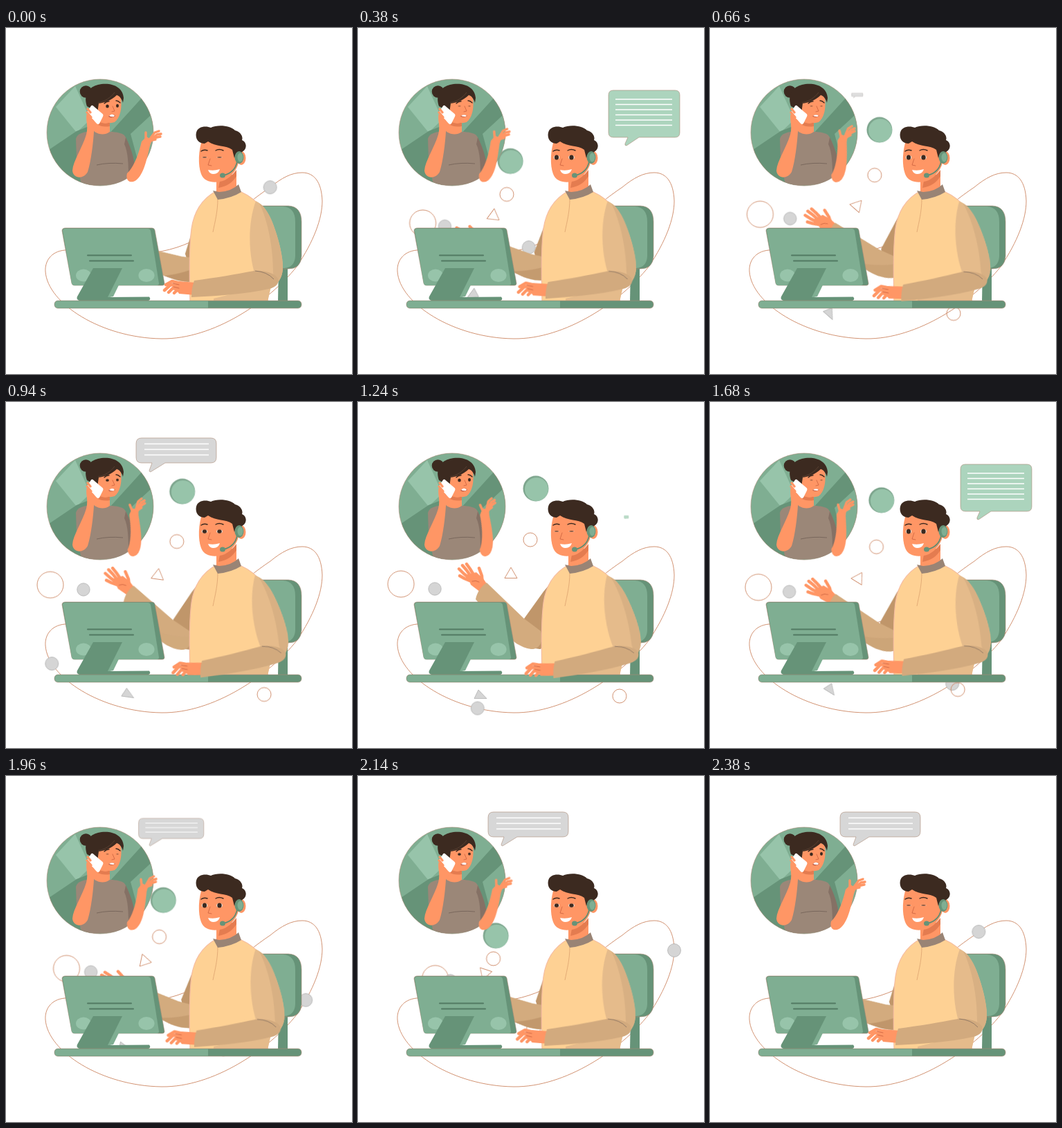
An HTML page that plays this animation: 500x500 px, repeating every 2400 ms.

```html
<!DOCTYPE html>
<html lang="en">
<head>
<meta charset="utf-8">
<title>Support call</title>
<style>
  html, body { margin: 0; width: 100%; height: 100%; overflow: hidden; background: #fff; }
  svg { display: block; width: 500px; height: 500px; }
  .mid { fill: #7fae92; }
  .dark { fill: #669378; }
  .light { fill: #97c4aa; }
  .skin { fill: #ff9665; }
  .hair { fill: #3c2a20; }
  .line { fill: none; stroke: #cc8663; stroke-width: .9; }
  .rim { stroke: #ab8b78; stroke-width: .6; }
  .ball { fill: #d5d5d5; stroke: #aaa; stroke-width: .7; }
  .fingers { fill: none; stroke: #ff9665; stroke-width: 4.4px; stroke-linecap: round; stroke-linejoin: round; }
  .fingers.thin { stroke-width: 3.4px; }
  .crease { fill: none; stroke: #c9613f; stroke-width: .8; stroke-linecap: round; }
  .brow { fill: none; stroke: #3c2a20; stroke-width: 1.4; stroke-linecap: round; }
  .rules { stroke: #fff; stroke-width: 1.4; }
  #shoulder { transform-origin: 290px 262px; }
  #elbow { transform-origin: 248px 341px; }
  #sleeve { transform-origin: 365px 262px; }
  #forearm { transform-origin: 385px 365px; }
  #wave { transform-origin: 184px 210px; }
  #manEyes { transform-origin: 298px 187px; }
  #womanEyes { transform-origin: 153px 113px; }
  #womanMouth { transform-origin: 153px 127px; }
  #reply { transform-origin: 386px 169px; }
  #ask { transform-origin: 207px 101px; }
</style>
</head>
<body>
<svg viewBox="0 0 500 500">
  <defs>
    <clipPath id="disc"><circle cx="136" cy="151" r="77"/></clipPath>
  </defs>

  <path id="orbit" class="line" d="M382 230C340 258 300 300 247 317C190 336 130 318 85 321C64 323 56 338 57 352C60 398 138 448 225 449C300 450 380 395 420 345C445 308 457 275 457 250C456 222 445 209 428 209C412 209 398 217 382 230Z"/>
  <circle id="satellite" class="ball" r="9.5"/>

  <!-- pieces that fly out from behind the monitor -->
  <g id="bigRing"><circle class="line" r="19"/></g>
  <g id="dot"><circle class="ball" r="9.2"/></g>
  <g id="smallRing"><circle class="line" r="10"/></g>
  <g id="deskRing"><circle class="line" r="10"/></g>
  <g id="openTri"><path class="line" d="M0 -9L9 6.5H-9Z"/></g>
  <g id="solidTri"><path class="ball" d="M-2 -7L10 5.5H-8Z"/></g>
  <g id="greenDot"><circle r="18.5" fill="#7da58d"/><circle class="light" cx="1" cy="1" r="17"/></g>

  <!-- caller -->
  <g clip-path="url(#disc)">
    <rect class="mid" x="58" y="73" width="157" height="156"/>
    <path class="light" d="M72 114L100 84L122 132L102 151Z"/>
    <path class="dark" d="M56 180L102 149L125 140V230H56Z"/>
    <path class="dark" d="M148 154L199 98L216 120L186 148L204 182L200 214H150Z"/>
    <path class="mid" d="M180 153L216 120V200L196 212Z"/>
  </g>
  <circle class="rim" cx="136" cy="151" r="77" fill="none"/>
  <path fill="#9b8778" d="M101 160C103 152 113 150 124 149L154 150C163 151 170 152 173 158C180 173 186 192 186 206L176 216C162 229 122 231 108 222L102 190Z"/>
  <path fill="#857165" d="M173 158C181 174 187 192 186 208L177 213C177 195 176 178 171 168Z"/>
  <path d="M131 198Q148 194 169 196" fill="none" stroke="#75645a" stroke-width=".9"/>
  <g id="wave">
    <path class="skin" d="M175 210C172 222 181 225 188 220C199 212 204 188 208 170L211 162L203 157L196 164C192 181 186 197 178 207Z"/>
    <path class="fingers thin" d="M202 166V151M206 163L215 151L221 149M208 163L218 154L224 153M208 164L218 158L223 157M207 163L216 161"/>
  </g>
  <path class="skin" d="M128 130H150V150Q140 157 128 150Z"/>
  <path fill="#e47c50" d="M131 133Q142 141 150 136V142Q140 144 131 139Z"/>
  <circle class="hair" cx="115.500" cy="92" r="8.800"/>
  <path class="skin" d="M129 100C140 92 158 92 166 101C168 115 165 130 157 136C147 140 133 133 130 121Z"/>
  <path class="hair" d="M117 113C111 96 120 83 138 81C156 79 169 87 170 101L169 108C167 102 164 98 160 97C152 105 142 108 134 109L132 123L126 118Z"/>
  <path d="M133 108C143 106 151 101 157 93" fill="none" stroke="#654a3a" stroke-width=".7"/>
  <path class="brow" d="M142 109Q145 106 149 106M159 105Q162 105 165 108"/>
  <g id="womanEyes">
    <ellipse class="hair" cx="146.500" cy="113" rx="2.300" ry="2.500"/>
    <ellipse class="hair" cx="161" cy="112.500" rx="2" ry="2.400"/>
  </g>
  <path class="crease" d="M154 113L157 120L153 121"/>
  <g id="womanMouth">
    <path fill="#b54b38" d="M148 128Q153 122 158 127Q153 131 148 128Z"/>
    <path fill="#fff" d="M149 127Q153 123 157 126.500L156 128Q152 129 149 127Z"/>
  </g>
  <path class="skin" d="M118 122C113 130 120 140 116 154C110 174 97 192 96 206C97 218 112 219 118 208C123 192 126 166 127 150L134 139L126 116Z"/>
  <path fill="#fff" d="M123 112.500Q124.500 111 126 112.500L140 124.500Q141 126 140 128L135 138Q133 140 131 138L118 124Q116.500 122 118 120Z"/>
  <path class="fingers thin" d="M118 117L122 122M117 122L123 129M118 127L126 135"/>

  <!-- chair -->
  <path class="dark" d="M394 342H407V396H393Z"/>
  <path class="dark rim" d="M368 257H408Q427 258 427 280V330Q426 348 408 348H370Z"/>
  <path class="mid" d="M366 258H400Q418 259 418 280V330Q417 346 402 347H370Z"/>

  <!-- agent: far arm -->
  <g id="shoulder">
    <path fill="#c0966a" d="M288 250L268 274L240 313L240 345Q252 358 264 357L290 320Z"/>
    <g id="elbow">
      <path class="skin" d="M158 249L171 246L181 255L187 264L176 274L163 264Z"/>
      <path class="fingers" d="M166 260L154 255L147 251M163 256L153 248L146 241M164 253L157 243L151 236M168 251L162 241L157 234M180 264L179 251L175 240"/>
      <path class="crease" d="M165 259Q170 257 175 260"/>
      <path fill="#d3ab7e" d="M186 261L240 313L264 331C269 346 262 358 250 357C235 355 222 345 214 336L170 285C172 275 178 266 186 261Z"/>
      <path id="underarm" fill="#c0966a" d="M204 324C222 332 240 337 264 339C269 347 262 358 250 357C235 355 222 345 214 336Z"/>
    </g>
  </g>

  <!-- agent: body -->
  <path d="M303 236C287 245 272 262 268 290C264 320 265 360 266 395H378L388 310C384 274 368 249 338 236Z" fill="#fed194" stroke="#f6bda0" stroke-width="1.200"/>
  <path fill="#e5bb8b" d="M300 391L384 370L378 395H300Z"/>
  <path d="M306 247C306 265 302 280 299 295" fill="none" stroke="#e0a873" stroke-width=".9"/>
  <path class="skin" d="M304 212H333V234Q320 246 304 238Z"/>
  <path fill="#e47c50" d="M309 221Q323 219 333 205V214Q325 228 307 231Z"/>
  <path fill="#998475" d="M299 235L308 237Q326 236 336 226L340 237Q326 246 306 248Z"/>

  <!-- agent: head -->
  <path class="skin" d="M284 160C278 176 277 198 282 211C287 224 303 225 316 220C328 213 335 203 337 190L336 160Z"/>
  <ellipse class="skin" cx="340" cy="188" rx="6.500" ry="10"/>
  <path class="hair" d="M287 167C278 167 273 160 275 151C277 142 289 141 296 144C306 139 325 141 331 148C339 150 343 157 341 162C348 165 348 173 344 177L340 180L333 181L330 188L327 176C318 169 303 172 292 164Z"/>
  <path class="brow" d="M282 178Q286 175 291 177M303 177Q308 174 314 177"/>
  <g id="manEyes">
    <ellipse cx="287" cy="187" rx="4.200" ry="3" fill="#f6e6dc"/><ellipse class="hair" cx="287" cy="187" rx="3.100" ry="3.500"/>
    <ellipse cx="308.500" cy="187" rx="4.400" ry="3" fill="#f6e6dc"/><ellipse class="hair" cx="308.500" cy="187" rx="3.200" ry="3.500"/>
  </g>
  <path class="crease" d="M295 189L292 198L297 199"/>
  <path fill="#fff" d="M292 205Q300 207 309 204Q307 211 300 211Q294 211 292 205Z"/>
  <path d="M334 193Q331 209 314 213" fill="none" stroke="#5f8c72" stroke-width="1.700"/>
  <ellipse class="dark" cx="313" cy="213" rx="4" ry="3.500"/>
  <ellipse class="dark" cx="337" cy="187" rx="6.500" ry="9"/>
  <ellipse cx="338.500" cy="187" rx="4" ry="6.500" class="mid"/>

  <!-- monitor -->
  <path class="dark rim" d="M86 289H211Q214 289 215 292L229 369Q229 372 226 372H99Q96 372 95 369L81 293Q81 289 86 289Z"/>
  <path class="mid" d="M86 290H205Q208 290 209 293L221 369Q221 372 218 372H99Q96 372 95 369L82 293Q82 290 86 290Z"/>
  <path d="M118 328.500H181M121 336.500H184" stroke="#527a63" stroke-width="2" stroke-linecap="round"/>
  <ellipse class="light" cx="112" cy="357.500" rx="11" ry="9"/>
  <ellipse class="light" cx="203" cy="357.500" rx="11.500" ry="9.500"/>
  <path class="mid" d="M150 347H175L155 388L140 391Z"/>
  <path class="dark" d="M126 347H168L147 389L207 388.500Q210 392 206 394H106Q101 392 103 388Z"/>

  <!-- desk -->
  <rect class="dark rim" x="70" y="394" width="357" height="11" rx="5"/>
  <path class="mid" d="M75 394.500H292V404.500H75Q70.500 404 70.500 399.500Q70.500 395 75 394.500Z"/>

  <!-- agent: near arm -->
  <g id="sleeve">
    <path fill="#e5bb8b" d="M361 250C372 255 382 270 389 292C395 310 400 330 400 346C400 362 392 372 380 376L362 362C352 338 347 288 361 250Z"/>
    <path fill="#d8b083" d="M366 253C374 258 382 270 389 292C395 310 400 330 400 346C400 356 396 364 390 370L386 354C386 318 379 280 366 253Z"/>
  </g>
  <g id="forearm">
    <path class="skin" d="M274 368L250 366L243 372L250 384L274 386Z"/>
    <path class="fingers" d="M252 369L240 366L231 371M250 373L238 371L229 379M251 378L241 376L235 382M254 381L247 379L243 383"/>
    <path class="crease" d="M250 371L241 369M250 376L242 374"/>
    <path fill="#d2aa7e" d="M272 365C302 361 332 356 358 351C374 350 388 354 393 362Q396 373 380 377C344 385 305 387 268 389Q268 376 272 365Z"/>
    <path d="M360 351Q377 352 387 363" fill="none" stroke="#8d7562" stroke-width=".9"/>
  </g>

  <!-- speech bubbles -->
  <g id="reply">
    <path class="rim" fill="#acd4bd" d="M369 90H458Q465 90 465 97V151Q465 158 458 158H406L388 170Q385 170 386 167L390 158H369Q362 158 362 151V97Q362 90 369 90Z"/>
    <path class="rules" d="M372 103H454M372 110.500H454M372 118H454M372 125.500H454M372 133H454M372 140.500H454"/>
  </g>
  <g id="ask">
    <path class="rim" fill="#d7d7d7" d="M196 52H296Q304 52 304 60V80Q304 88 296 88H230L209 101Q207 101 207 99L211 88H196Q188 88 188 80V60Q188 52 196 52Z"/>
    <path class="rules" d="M200 60.500H293M200 68.500H293M200 76.500H293"/>
  </g>
</svg>

<script>
const LOOP = 2400, HALF = LOOP / 2;
const $ = id => document.getElementById(id);
const run = (id, frames, duration = LOOP) =>
  $(id).animate(frames, { duration, iterations: Infinity });

// there and back in one loop
const swing = (id, rest, peak, out = 'ease-in-out', back = out, prop = 'transform') => run(id, [
  { [prop]: rest, easing: out },
  { [prop]: peak, easing: back },
  { [prop]: rest }
]);

// steps are [ms, value, easing] within half a loop
const steps = (id, list, toTransform) => run(id, list.map(([ms, v, easing = 'linear']) =>
  ({ offset: ms / HALF, transform: toTransform(v), easing })), HALF);
const squash = v => `scaleY(${v})`;
const zoom = v => `scale(${v})`;

swing('shoulder', 'rotate(-18.6deg)', 'rotate(0deg)');
swing('elbow', 'rotate(-12deg)', 'rotate(0deg)');
swing('underarm', 1, 0, 'ease-in-out', 'ease-in-out', 'opacity');
swing('sleeve', 'rotate(0deg)', 'rotate(-6deg)');
swing('forearm', 'translate(0px, 0px) rotate(0deg)', 'translate(12px, 0px) rotate(-5deg)');
swing('wave', 'rotate(0deg)', 'rotate(-24deg)');

const floaters = [
  ['bigRing', 62, 263], ['dot', 111, 270], ['smallRing', 249, 199], ['deskRing', 378, 425],
  ['openTri', 221, 248, 360], ['solidTri', 176, 423, 360], ['greenDot', 257, 125]
];
for (const [id, x, y, spin = 0] of floaters) {
  swing(id, `translate(152px, 317px) rotate(${spin}deg)`, `translate(${x}px, ${y}px) rotate(0deg)`,
    'cubic-bezier(.2, 0, .1, 1)', 'cubic-bezier(.9, 0, .8, 1)');
}

steps('manEyes', [[0, .18], [70, .18], [220, 1], [860, 1], [960, .75], [1130, .18], [1200, .18]], squash);
steps('womanEyes', [[0, 1], [120, 1], [260, .18], [800, .18], [1000, 1], [1200, 1]], squash);
steps('womanMouth', [[0, 1], [120, 1], [260, .7], [800, .7], [1000, 1], [1200, 1]], squash);

steps('reply', [[0, 0, 'ease-in-out'], [230, 1], [600, 1], [600, 0], [1200, 0]], zoom);
steps('ask', [[0, 0], [600, 0, 'ease-in-out'], [830, 1], [1200, 1]], zoom);

// constant speed along the orbit
const orbit = $('orbit'), total = orbit.getTotalLength(), parts = 120;
run('satellite', Array.from({ length: parts + 1 }, (_, i) => {
  const { x, y } = orbit.getPointAtLength(total * i / parts);
  return { transform: `translate(${x}px, ${y}px)` };
}));
</script>
</body>
</html>
```
